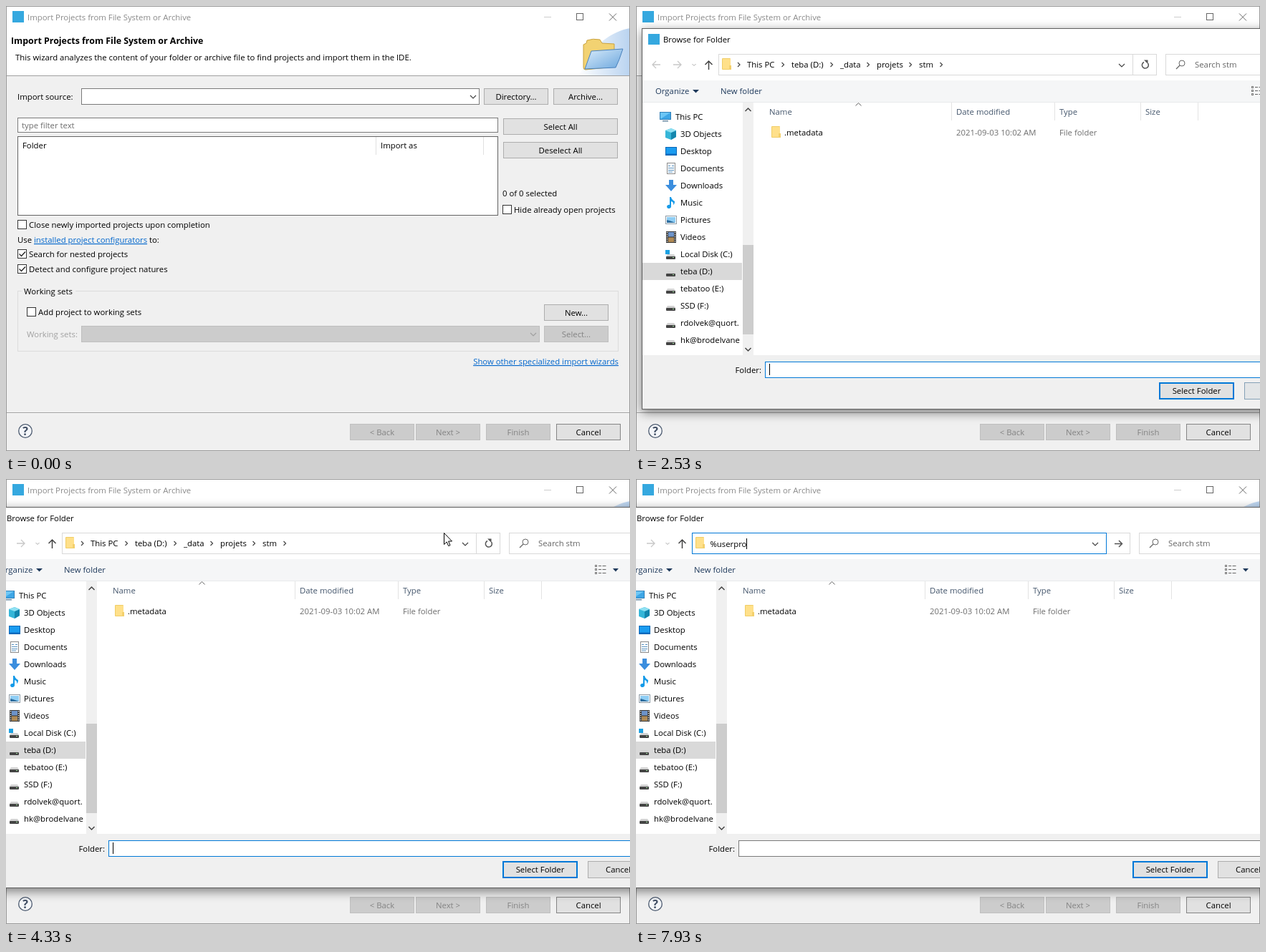
These frames come from a looping animation (871 by 622 pixels, 8 s). An HTML page:

```html
<!DOCTYPE html>
<html lang="en">
<head>
<meta charset="utf-8">
<title>Import wizard</title>
<style>
html, body { margin: 0; width: 100%; height: 100%; overflow: hidden; background: #f0f0f0; }
svg { display: block; width: 871px; height: 622px; }
text { font: 11.35px "Open Sans", "Noto Sans", sans-serif; white-space: pre; }
.bold { font-size: 12.4px; font-weight: 700; }
.link { fill: #0066cc; text-decoration: underline; }
.line { fill: none; }
</style>
</head>
<body>
<svg id="stage" viewBox="0 0 871 622" xmlns="http://www.w3.org/2000/svg"></svg>
<script>
const LOOP = 8000, OPEN = 1070, CLICK = 4940, BLINK = 530;
const BLUE = '#0078d7', EDGE = '#7a7a7a', GREY = '#e1e1e1';

// Drawing helpers
const text = (s, x, y, fill = '#000', attrs = '') =>
  `<text x="${x}" y="${y}" fill="${fill}" ${attrs}>${s}</text>`;
const mid = (s, x, y, fill) => text(s, x, y, fill, 'text-anchor="middle"');
const fillBox = (x, y, x2, y2, fill, attrs = '') =>
  `<rect x="${x}" y="${y}" width="${x2 - x}" height="${y2 - y}" fill="${fill}" ${attrs}/>`;
const box = (x, y, x2, y2, fill = '#fff', stroke = EDGE, attrs = '') =>
  `<rect x="${x + .5}" y="${y + .5}" width="${x2 - x - 1}" height="${y2 - y - 1}" fill="${fill}" stroke="${stroke}" ${attrs}/>`;
const line = (d, stroke, w = 1, attrs = '') =>
  `<path class="line" d="${d}" stroke="${stroke}" stroke-width="${w}" ${attrs}/>`;
const shape = (d, fill, attrs = '') => `<path d="${d}" fill="${fill}" ${attrs}/>`;
const chevron = (x, y, dx, dy, stroke = '#444', w = 1.2) => dx
  ? line(`M${x - dx / 2} ${y - 3}l${dx} 3l${-dx} 3`, stroke, w)
  : line(`M${x - 4} ${y - dy / 2}l4 ${dy}l4 ${-dy}`, stroke, w);
const at = (x, y, body) => `<g transform="translate(${x} ${y})">${body}</g>`;

const button = (s, x, y, w = 90, edge = '#adadad') =>
  box(x, y, x + w, y + 23, GREY, edge) + mid(s, x + w / 2, y + 16);
const dimButton = (s, x, y) =>
  box(x, y, x + 90, y + 23, '#ccc', '#bfbfbf') + mid(s, x + 45, y + 16, '#838383');
const check = (s, x, y, on, labelX = x + 16) =>
  box(x, y, x + 13, y + 13, '#fff', '#333') +
  (on ? line(`M${x + 2.5} ${y + 6.5}l3 3l5.5 -6`, '#222', 1.3) : '') + text(s, labelX, y + 11);
const folder = (x, y) =>
  fillBox(x, y, x + 12, y + 16, '#f0cd66', 'rx="1"') + fillBox(x + 1, y + 1, x + 12, y + 15, '#ffe08a') +
  fillBox(x + 10, y + 10, x + 13, y + 16, '#f3d06c');

const wizard = () =>
  fillBox(0, 0, 871, 622, '#f0f0f0') + fillBox(0, 0, 871, 97, '#fff') +
  shape('M798 97C812 84 812 64 834 48C846 39 858 33 871 31V97Z', 'url(#sky)') +
  shape('M806 54l4 -2l1 -4q8 -3 18 -1l3 5l17 1v32l-40 4q-3 0 -3 -3Z', '#f2d272', 'stroke="#c9a23f"') +
  shape('M817 63l44 -3q-5 16 -10 26l-43 2Z', 'url(#flap)', 'stroke="#4a82bd"') +
  fillBox(0, 97, 871, 98, '#a0a0a0') +
  fillBox(9, 7, 25, 23, '#35a8df') +
  text('Import Projects from File System or Archive', 30, 20, '#8a8a8a') +
  line('M751 15.5h10', '#ccc') + box(796, 10, 806, 20, 'none', '#666') +
  line('M842 10.500l10 10m0 -10l-10 10', '#666') +
  text('Import Projects from File System or Archive', 7, 53, '#000', 'class="bold"') +
  text('This wizard analyzes the content of your folder or archive file to find projects and import them in the IDE.', 13, 76) +
  text('Import source:', 16, 131) + box(105, 115, 661, 138) + chevron(652, 127, 0, 4) +
  button('Directory...', 667, 115) + button('Archive...', 764, 115) +
  box(16, 156, 687, 177) + text('type filter text', 22, 171, '#6d6d6d') +
  button('Select All', 694, 157, 160) + button('Deselect All', 694, 190, 160) +
  box(16, 182, 687, 293, '#fff', '#646464') +
  fillBox(516, 183, 517, 208, '#e0e0e0') + fillBox(666, 183, 667, 208, '#e0e0e0') +
  text('Folder', 23, 199) + text('Import as', 523, 199) +
  text('0 of 0 selected', 693, 266) + check('Hide already open projects', 693, 278) +
  check('Close newly imported projects upon completion', 16, 299) +
  text('Use <tspan class="link">installed project configurators</tspan> to:', 16, 331) +
  check('Search for nested projects', 16, 340, true) +
  check('Detect and configure project natures', 16, 361, true) +
  box(16, 398, 855, 483, 'none', '#dcdcdc') + fillBox(22, 396, 97, 402, '#f0f0f0') +
  text('Working sets', 25, 403) + check('Add project to working sets', 29, 421) +
  button('New...', 751, 417) + text('Working sets:', 29, 463, '#a0a0a0') +
  box(105, 447, 745, 470, '#ccc', '#bfbfbf') + chevron(736, 459, 0, 4, '#a0a0a0') +
  dimButton('Select...', 751, 447) +
  text('Show other specialized import wizards', 855, 501, '#0066cc', 'class="link" text-anchor="end"') +
  fillBox(0, 568, 871, 569, '#a0a0a0') + fillBox(0, 569, 871, 570, '#fbfbfb') +
  '<circle cx="27" cy="594" r="9.3" fill="#f4f6f9" stroke="#4d5b70" stroke-width="1.3"/>' +
  text('?', 27, 600, '#3f4d63', 'text-anchor="middle" style="font-size:16px;font-weight:700"') +
  dimButton('&lt; Back', 480, 584) + dimButton('Next &gt;', 572, 584) + dimButton('Finish', 670, 584) +
  button('Cancel', 768, 584, 90, '#858585') +
  box(0, 0, 871, 622, 'none', '#999');

// Tree icons on a 16 px grid
const slab = shape('M3 8h9l2.500 3.500h-14Z', '#d3d3d3') + fillBox(1, 11, 14, 15, '#444', 'rx="1"') +
  fillBox(10, 12, 12, 13, '#9fe09f');
const icons = {
  pc: fillBox(0, 1, 16, 12, '#2f7fb8') + fillBox(1, 2, 15, 11, '#6cc6f5') +
    shape('M1 11L15 2V11Z', '#3ea6e6') + fillBox(4, 13, 12, 14.5, '#6b8ba4'),
  cube: shape('M0 3L8 0L15 3V12L8 16L0 13Z', '#35b6d8') + shape('M8 6L15 3V12L8 16Z', '#1486ad') +
    shape('M0 3L8 0L15 3L8 6Z', '#8fe0f2'),
  desk: box(0, 2, 16, 14, '#1a9cf0', '#0a66b5') + fillBox(1, 11.5, 15, 13, '#0b6cc0'),
  doc: box(2, 0, 14, 16, '#fff', '#8a8a8a') + line('M4 4.500h3m2 0h3M4 7.500h8M4 10.500h8M4 13h6', '#5590c0'),
  down: shape('M5 0H11V7H16L8 16L0 7H5Z', '#3b8ede'),
  note: shape('M6 0h2q1 4 5 6q0 4 -2 5q1 -4 -3 -5v7a3 2.600 0 1 1 -2 -2Z', '#159ae8'),
  pic: box(0, 2, 16, 14, '#fff', '#8c9aa5') + fillBox(2, 4, 14, 12, '#8ecdf4') + shape('M2 12V8l4 1l8 3Z', '#2d6d9e'),
  film: fillBox(1, 0, 15, 16, '#333') + fillBox(4, 1, 12, 7.5, '#6d93c9') + fillBox(4, 8.5, 12, 15, '#b08a54') +
    line('M2.500 1v15M13.500 1v15', '#eee', 1.4, 'stroke-dasharray="1.5 1.5"'),
  disk: fillBox(0, 2, 6, 8, '#1ba1e2') + slab,
  drive: slab
};
const tree = [
  ['cube', '3D Objects'], ['desk', 'Desktop'], ['doc', 'Documents'], ['down', 'Downloads'],
  ['note', 'Music'], ['pic', 'Pictures'], ['film', 'Videos'], ['disk', 'Local Disk (C:)'],
  ['drive', 'teba (D:)'], ['drive', 'tebatoo (E:)'], ['drive', 'SSD (F:)'],
  ['drive', 'rdolvek@quort.'], ['drive', 'hk@brodelvane']
];
const crumbs = [['This PC', 155], ['teba (D:)', 217], ['_data', 285], ['projets', 336], ['stm', 395]];
const columns = [['Name', 186], ['Date modified', 447], ['Type', 591], ['Size', 711]];
const INK = '#44566c', NAVY = '#1e395b';

const dialog = () =>
  fillBox(8, 35, 951, 568, '#000', 'opacity=".5" filter="url(#blur)"') +
  box(8, 31, 951, 564, '#fff', '#5f5f5f') +
  fillBox(17, 39, 33, 54, '#35a8df') + text('Browse for Folder', 38, 51) +
  line('M34 82H23m5 -5l-5 5l5 5M52 82h11m-5 -5l5 5l-5 5', '#c8c8c8', 1.3) +
  line('M78.500 81l2.500 2.500l2.500 -2.500', '#aaa') +
  line('M101.500 89V77m-5 5l5 -5l5 5', '#444', 1.5) +
  box(693, 67, 727, 97, '#fff', '#d9d9d9') +
  box(115, 67, 694, 97, '#fff', '#d9d9d9', 'id="address"') + folder(120, 73) +
  `<g id="crumbs">${chevron(143.5, 82, 3)}${crumbs.map(c => text(c[0], c[1], 86)).join('')}` +
  [205, 273, 324, 383, 426].map(x => chevron(x, 82, 3)).join('') + '</g>' +
  '<g id="edit">' + fillBox(140, 75, 251, 90, BLUE, 'id="mark"') + text('', 140, 86.5, '#fff', 'id="path"') +
  fillBox(0, 75, 1, 90, '#000', 'id="caret"') + '</g>' +
  chevron(678, 83, 0, 4) +
  '<g id="refresh">' + line('M714.500 80A4.500 4.500 0 1 1 709 78.500', '#555', 1.5) + shape('M709 75.500h5.500v5.500Z', '#555') + '</g>' +
  line('M705 82.500h10.500m-4.500 -4.500l4.500 4.500l-4.500 4.500', '#555', 1.5, 'id="go"') +
  box(739, 67, 941, 97, '#fff', '#d9d9d9') +
  '<circle class="line" cx="762" cy="80" r="4" stroke="#666"/>' + line('M759 83l-5 5', '#666', 1.2) +
  text('Search stm', 780, 86, '#666') +
  fillBox(9, 104, 950, 134, '#f5f6f7') + fillBox(9, 134, 950, 135, '#e8eaec') +
  text('Organize', 27, 123, NAVY) + shape('M79 117h9l-4.500 4.500Z', NAVY) + text('New folder', 118, 123, NAVY) +
  [113.5, 118.5, 123.5].map(y => box(859, y - 1.5, 862, y + 1.5, '#fff', '#777') +
    line(`M864 ${y}h4m1.500 0h5`, '#666')).join('') +
  shape('M884 117h8l-4 4.500Z', NAVY) +
  fillBox(9, 359, 148, 383, '#d9d9d9') +
  `<g clip-path="url(#pane)">${at(33, 147, icons.pc)}${text('This PC', 55, 159)}` +
  tree.map(([icon, label], i) => at(41, 171 + i * 24, icons[icon]) + text(label, 62, 183 + i * 24)).join('') + '</g>' +
  fillBox(149, 135, 164, 488, '#f0f0f0') + fillBox(149, 334, 164, 459, '#cdcdcd') +
  chevron(156.5, 145, 0, -4, '#444', 1.5) + chevron(156.5, 480, 0, 4, '#444', 1.5) +
  columns.map(c => text(c[0], c[1], 152, INK)).join('') + chevron(310.5, 137.5, 0, -4, '#666', 1) +
  [440, 584, 704, 784].map(x => fillBox(x, 135, x + 1, 160, '#e3e3e3')).join('') +
  folder(189, 168) + text('.metadata', 207, 181) +
  text('2021-09-03 10:02 AM', 447, 181, '#6d6d6d') + text('File folder', 591, 181, '#6d6d6d') +
  fillBox(9, 488, 950, 563, '#f0f0f0') + text('Folder:', 175, 513, '#000', 'text-anchor="end"') +
  box(180, 497, 937, 520, '#fff', BLUE, 'id="field"') + fillBox(186, 500, 187, 516, '#000', 'id="fieldCaret"') +
  `<rect x="731" y="527" width="103" height="22" fill="${GREY}" stroke="${BLUE}" stroke-width="2"/>` +
  mid('Select Folder', 782.5, 542) +
  box(849, 526, 938, 550, GREY, '#adadad', 'id="cancel"') + text('Cancel', 874, 542);

const stage = document.getElementById('stage');
stage.innerHTML = `<defs>
  <linearGradient id="sky"><stop stop-color="#fff"/><stop offset="1" stop-color="#b9d3f0"/></linearGradient>
  <linearGradient id="flap" x2="1" y2="1"><stop stop-color="#d9ecfb"/><stop offset="1" stop-color="#6ba6dd"/></linearGradient>
  <filter id="blur" x="-10%" y="-10%" width="120%" height="120%"><feGaussianBlur stdDeviation="7.5"/></filter>
  <clipPath id="pane"><rect x="9" y="135" width="139" height="353"/></clipPath></defs>
  ${wizard()}<g id="dialog">${dialog()}</g>
  <path id="cursor" d="M.5 .5V16.500L4.200 13L6.700 18.600L9 17.600L6.600 12H11.500Z" fill="#fff" stroke="#000"/>`;

const el = {};
stage.querySelectorAll('[id]').forEach(n => { el[n.id] = n; });

// Motion
const clamp = v => Math.max(0, Math.min(1, v));
const easeOut = p => 1 - (1 - clamp(p)) ** 3;
const smooth = p => p * p * (3 - 2 * p);
const mix = (a, b, p) => `rgb(${a.map((v, i) => Math.round(v + (b[i] - v) * p))})`;
const show = (node, on) => { node.style.display = on ? '' : 'none'; };

// Keys are [time, x, y, eased]
function track(keys, t) {
  if (t <= keys[0][0]) return keys[0].slice(1, 3);
  const i = keys.findIndex(k => k[0] > t);
  if (i < 0) return keys[keys.length - 1].slice(1, 3);
  const [a, b] = [keys[i - 1], keys[i]];
  const p = (t - a[0]) / (b[0] - a[0]), e = b[3] ? smooth(p) : p;
  return [1, 2].map(k => Math.round(a[k] + (b[k] - a[k]) * e));
}
const pointer = [
  [130, 876, 330], [930, 731, 127, 1], [1600, 731, 127], [2100, 839, 480, 1], [2460, 839, 480],
  [2530, 880, 535], [2700, 884, 535], [3330, 673, 53, 1], [3400, 673, 53], [3670, 661, 54],
  [3930, 640, 58], [4070, 634, 61], [4200, 630, 75], [4870, 440, 78, 1]
];
const drag = [[3400, 0, 0], [3670, -12, 1], [3930, -30, 5], [4130, -37, 8]];
const blinks = [OPEN, 1600, 2130, 2660, 3190, 3660, 3900, 4430];
const typed = '%userpro', keys = [6200, 7130, 7270, 7330, 7470, 7730, 7870, 7930];

function render(t) {
  const open = easeOut((t - OPEN) / 260), scale = .93 + .07 * open;
  const [dx, dy] = track(drag, t);
  show(el.dialog, open > 0);
  el.dialog.setAttribute('opacity', open);
  el.dialog.setAttribute('transform', open < 1
    ? `translate(480 297.5) scale(${scale}) translate(-480 -297.5)` : `translate(${dx} ${dy})`);

  const editing = t >= CLICK, count = keys.filter(k => t >= k).length;
  show(el.crumbs, !editing);
  show(el.edit, editing);
  show(el.mark, !count);
  show(el.refresh, !count);
  show(el.go, count);
  el.address.setAttribute('stroke', editing ? BLUE : '#d9d9d9');
  el.path.textContent = count ? typed.slice(0, count) : 'D:\\_data\\projets\\stm';
  el.path.setAttribute('x', count ? 140.5 : 140);
  el.path.setAttribute('fill', count ? '#000' : '#fff');
  const last = count ? keys[count - 1] : CLICK;
  show(el.caret, Math.floor((t - last) / BLINK) % 2 === 0);
  if (editing) el.caret.setAttribute('x', count ? Math.round(140 + el.path.getComputedTextLength()) : 251);

  show(el.fieldCaret, blinks.filter(b => t >= b).length % 2);
  el.field.setAttribute('stroke', mix([0, 120, 215], [122, 122, 122], easeOut((t - CLICK) / 260)));
  const hover = clamp((t - 2500) / 130) * (1 - clamp((t - 2850) / 200));
  el.cancel.setAttribute('fill', mix([225, 225, 225], [229, 241, 251], hover));
  el.cancel.setAttribute('stroke', mix([173, 173, 173], [0, 120, 215], hover));

  show(el.cursor, t >= 130 && t < 7130);
  el.cursor.setAttribute('transform', `translate(${track(pointer, t)})`);
}

const start = performance.now();
function tick() {
  render((performance.now() - start) % LOOP);
  requestAnimationFrame(tick);
}
tick();
</script>
</body>
</html>
```
